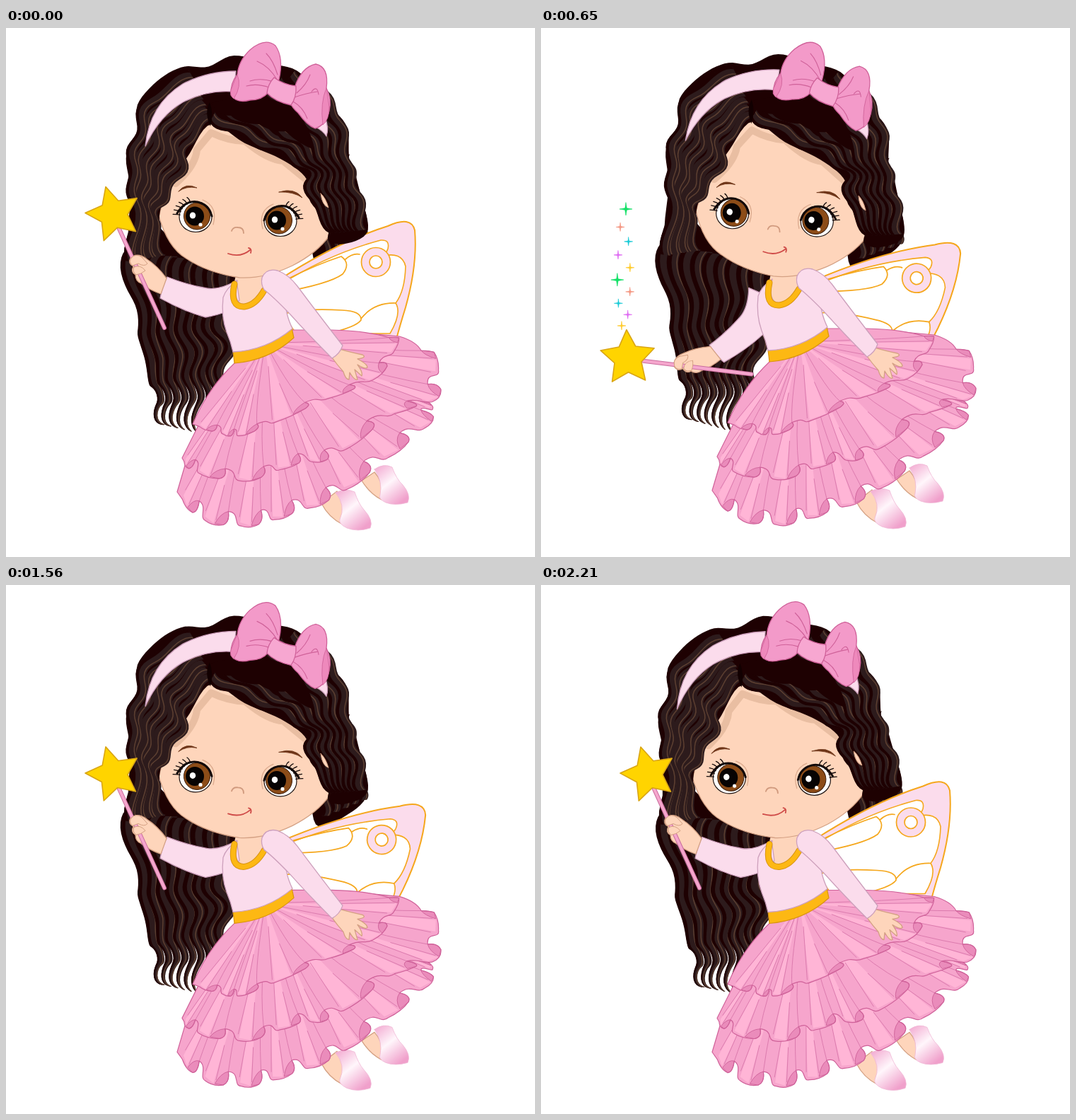
These frames come from a looping animation (748x748 px, 2340 ms). An HTML page:

```html
<!DOCTYPE html>
<html lang="en">
<head>
<meta charset="utf-8">
<title>Little fairy</title>
<style>
html, body { margin: 0; width: 100%; height: 100%; overflow: hidden; background: #fff; }
svg { display: block; width: 100vw; height: 100vh; }
</style>
</head>
<body>
<svg id="stage" viewBox="0 0 748 748"></svg>
<script>
const HAIR = '#2d1b1c', DARK = '#1e0102', SHINE = '#5c3f31';
const SKIN = '#fed5bb', SKIN_LINE = '#d4a184', PALE = '#fbdcec', PALE_LINE = '#cda0bc';
const ROSE = '#f6a5cc', ROSE_LIGHT = '#ffb5d6', ROSE_DARK = '#ea8cbb', ROSE_LINE = '#cf6199';
const GOLD = '#fdb813', GOLD_LINE = '#f5a71c';

// ---- geometry ----
const parse = s => s.split(' ').map(p => p.split(',').map(Number));
const lerp = (a, b, k) => [a[0] + (b[0] - a[0]) * k, a[1] + (b[1] - a[1]) * k];
const num = p => p[0].toFixed(1) + ',' + p[1].toFixed(1);

// Point at t (0..1) of a smooth curve through p
function spot(p, t) {
  const n = p.length - 1, i = Math.max(0, Math.min(n - 1, Math.floor(t * n))), u = t * n - i;
  const [a, b, c, e] = [p[Math.max(0, i - 1)], p[i], p[i + 1], p[Math.min(n, i + 2)]];
  return [0, 1].map(k => b[k] + u * ((c[k] - a[k]) + u * ((2 * a[k] - 5 * b[k] + 4 * c[k] - e[k]) +
    u * (3 * (b[k] - c[k]) + e[k] - a[k]))) / 2);
}

// ---- drawing helpers ----
const path = (d, fill = 'none', line = 'none', w = 1.3) =>
  `<path d="${d}" fill="${fill}" stroke="${line}" stroke-width="${w}" stroke-linejoin="round" stroke-linecap="round"/>`;
const oval = (x, y, rx, ry, fill, line = 'none', w = 1) =>
  `<ellipse cx="${x}" cy="${y}" rx="${rx}" ry="${ry}" fill="${fill}" stroke="${line}" stroke-width="${w}"/>`;
const group = (id, body) => `<g id="${id}">${body}</g>`;
const repeat = (n, draw) => Array.from({ length: n }, (_, i) => draw(i)).join('');

function blob(str, fill) {
  const p = parse(str), steps = p.length * 6;
  return path('M' + Array.from({ length: steps + 1 }, (_, i) => num(spot(p, i / steps))).join('L') + 'Z', fill);
}

function star(x, y, r, inner, tips, turn) {
  const pts = Array.from({ length: tips * 2 }, (_, i) => {
    const a = turn * Math.PI / 180 + i * Math.PI / tips, q = i % 2 ? inner : r;
    return num([x + q * Math.cos(a), y + q * Math.sin(a)]);
  });
  return 'M' + pts.join('L') + 'Z';
}

// Waving strip along p; side shifts it across the lock
function ribbon(p, w0, w1, amp, waves, side, fill) {
  const left = [], right = [], steps = 50;
  for (let i = 0; i <= steps; i++) {
    const t = i / steps, c = spot(p, t), a = spot(p, t - .02), b = spot(p, t + .02);
    const len = Math.hypot(b[0] - a[0], b[1] - a[1]) || 1;
    const nx = (a[1] - b[1]) / len, ny = (b[0] - a[0]) / len;
    const w = w1 + (w0 - w1) * (1 - t * t), off = amp * Math.sin(2 * Math.PI * waves * t) + side * w;
    const grow = fill === SHINE ? .8 : w / 2 * (side ? .3 : 1);
    left.push(num([c[0] + nx * (off + grow), c[1] + ny * (off + grow)]));
    right.unshift(num([c[0] + nx * (off - grow), c[1] + ny * (off - grow)]));
  }
  return path('M' + left.concat(right).join('L') + 'Z', fill);
}

// Locks spread evenly between two guide curves
function fan(from, to, count, w0, w1, amp, waves) {
  const a = parse(from), b = parse(to);
  return repeat(count, i => {
    const guide = a.map((p, j) => lerp(p, b[j], i / (count - 1)));
    return ribbon(guide, w0, w1, amp, waves, 0, HAIR) + ribbon(guide, w0, w1, amp, waves, .38, DARK) +
      ribbon(guide, w0, w1, amp, waves, i % 2 ? -.1 : -.3, SHINE);
  });
}

// ---- hair behind the body ----
const backHair =
  blob('430,190 480,180 500,230 511,290 480,322 438,334 430,260', DARK) +
  fan('440,180 450,250 452,322', '480,180 494,235 505,300', 5, 13, 11, 3, 3) +
  blob('186,250 168,310 174,360 205,405 240,425 312,440 328,345 280,320 225,290', DARK) +
  fan('180,315 182,372 202,425 200,470 217,505 212,535 224,561', '316,335 306,375 304,415 312,450 306,490 304,530 300,580',
    9, 23, 1.5, 6, 3.5);

// ---- wing ----
const wing =
  path('M386,356Q470,302 540,280Q573,265 578,286Q582,335 565,395Q556,424 552,440L420,434Q396,415 386,400Z', PALE, GOLD_LINE, 2) +
  path('M388,363Q455,320 530,300Q543,299 540,312Q538,319 530,323Q560,315 565,337Q564,372 551,389Q560,403 543,432L410,432L392,405Z', '#fff', GOLD_LINE, 1.6) +
  path('M400,354Q440,334 474,323Q488,333 476,348Q457,362 388,374M394,404Q420,396 475,399Q503,400 502,413Q495,423 455,432M502,411Q520,388 551,389M480,327Q490,318 500,320', 'none', GOLD_LINE, 1.7) +
  oval(523, 331, 20.5, 20.5, PALE, GOLD_LINE, 1.7) + oval(523, 331, 9, 9, '#fff', GOLD_LINE, 1.7);

// ---- legs and dress ----
const legs =
  path('M446,672Q456,692 476,702Q482,680 468,655Z', SKIN, SKIN_LINE) +
  path('M503,640Q514,658 531,667Q536,645 521,628Z', SKIN, SKIN_LINE) +
  path('M466,657Q480,650 493,656Q498,672 506,681Q520,696 515,707Q497,713 482,707Q470,701 472,695Q481,675 466,657Z', 'url(#shoe)', '#f0b8d6', .8) +
  path('M521,624Q534,615 546,621Q552,638 561,646Q573,660 568,671Q550,676 537,671Q526,666 529,660Q533,642 521,624Z', 'url(#shoe)', '#f0b8d6', .8);

// One row of tube ruffles along a hem; folds run towards the waist
function tier(hemKeys, count, edge, reach) {
  const hem = parse(hemKeys), waist = [366, 446];
  const out = t => spot(hem, Math.max(0, Math.min(1, t / count)));
  const up = (t, k) => num(lerp(out(t), waist, k));
  const inset = .075;
  let d = 'M' + up(0, 0), light = '', folds = '', curls = '';
  for (let i = 0; i < count; i++) {
    const bite = i ? inset : 0;
    d += `L${up(i, bite)}C${up(i + .35, bite)} ${up(i + .2, 0)} ${up(i + .42, 0)}` +
      `Q${up(i + .7, -.02)} ${up(i + .95, 0)}Q${up(i + 1.1, .02)} ${up(i + 1, inset)}`;
    light += `M${up(i + .38, .02)}L${up(i + .68, 0)}L${up(i + .68, reach)}L${up(i + .38, reach)}Z`;
    curls += `M${up(i + .72, 0)}Q${up(i + .8, inset * .8)} ${up(i + 1, inset)}Q${up(i + 1.1, .02)} ${up(i + .95, 0)}Z`;
    folds += `M${up(i + 1, inset)}Q${up(i + .88, .3)} ${up(i + .95, reach)}` +
      `M${up(i + .34, .05)}L${up(i + .42, reach * .8)}M${up(i + .72, .02)}L${up(i + .68, reach * .5)}`;
  }
  d += edge + 'Z';
  return path(d, ROSE) + path(light, ROSE_LIGHT) + path(curls, ROSE_DARK, ROSE_LINE, .9) +
    path(folds, 'none', '#dc7bae', 1) + path(d, 'none', ROSE_LINE, 1.2);
}

const skirt =
  tier('242,656 276,694 340,704 400,688 467,662 541,607 601,556 599,530', 9, 'L590,500L366,450L255,612', .42) +
  tier('249,608 268,628 340,640 410,616 464,606 550,545 612,521 605,457', 9, 'Q580,443 556,436L470,428L366,450L275,556', .55) +
  tier('264,560 306,574 343,573 441,530 527,492 556,437', 7, 'Q510,428 460,427L404,427L323,474Q285,510 264,560', .88) +
  path('M321,457Q366,456 404,424L407,438Q372,470 323,474Z', GOLD, '#d99511', 1.2);

const neck = path('M326,345L320,372Q328,396 350,390L370,366L364,342Z', SKIN);
const collar = 'M323,362Q316,395 337,394Q353,392 365,371';

const bodice =
  path('M327,357Q311,368 307,381Q304,408 312,430Q318,444 321,458Q368,456 405,425Q394,402 396,385L386,355Q372,348 364,366Q350,390 337,391Q320,390 327,357Z', PALE, PALE_LINE) +
  path(collar, 'none', '#d99511', 9) + path(collar, 'none', GOLD, 7) +
  path('M472,454Q486,458 504,462Q511,466 497,468Q511,475 511,480Q508,483 497,476Q505,487 503,492L493,483L497,497Q493,499 486,487L485,497Q480,497 477,486Q468,476 461,466Z', SKIN, SKIN_LINE) +
  path('M362,353Q368,339 384,343Q400,349 412,365Q438,400 476,449Q472,461 461,467Q428,434 402,405Q379,381 365,370Q360,362 362,353Z', PALE, PALE_LINE);

// ---- arm with wand ----
const wand = 'M160,284L224,424';
const arm =
  path('M326,357Q302,371 284,368Q255,363 228,352Q221,365 218,382Q250,400 282,409Q300,406 314,400L330,385Z', PALE, PALE_LINE) +
  path('M227,354Q215,337 198,326Q186,317 176,325Q172,333 180,337Q176,345 183,349Q183,358 191,361Q202,370 219,376Z', SKIN, SKIN_LINE) +
  path(wand, 'none', '#c96d9d', 6) + path(wand, 'none', '#f5a6cd', 4) +
  path('M177,325Q184,318 192,324L200,333Q196,338 187,333L179,336Q173,331 177,325ZM181,338Q190,334 197,343Q191,348 184,349Q178,344 181,338Z', SKIN, SKIN_LINE, 1) +
  path(star(152, 263, 40, 20, 5, -106), '#ffd400', '#d9a514', 1.6);

// ---- head ----
function eye(x, y, side) {
  const gaze = x - side * 2;
  const lashes = repeat(6, i => {
    const a = (side * 52 - 90 + (i - 2.5) * 13) * Math.PI / 180, c = Math.cos(a), s = Math.sin(a);
    return `M${num([x + 22 * c, y + 20 * s])}Q${num([x + 26 * c, y + 26 * s])} ${num([x + 30 * c + side * 2, y + 28 * s])}`;
  });
  const lid = `M${x + side * 26},${y - 4}Q${x + side * 15},${y - 23} ${x - side * 3},${y - 20}Q${x - side * 19},${y - 16} ${x - side * 23},${y}`;
  return path(`M${x - side * 10},${y - 23}Q${x - side * 32},${y - 14} ${x - side * 25},${y + 12}`, 'none', '#dba98c', 1.2) +
    oval(x, y + 1, 23, 21.5, '#fff', '#1b1110', 1.2) + oval(gaze, y, 18.5, 19, '#8c4c18', '#3b1b08', 1) +
    oval(gaze - 3, y, 13, 13.5, '#070303') + oval(gaze - 6, y - 1, 4.2, 4.5, '#fff') + oval(gaze + 5, y + 12, 2.6, 2.6, '#fff') +
    path(lid, 'none', '#120909', 3) + path(lashes, 'none', '#120909', 1.3);
}

const face =
  path('M240,190L289,130L420,180L452,240Q466,272 457,294Q440,318 405,336Q365,355 330,353Q285,346 255,326Q228,310 216,265Z', SKIN, SKIN_LINE) +
  path('M240,220Q268,195 270,172L290,148Q315,160 338,160Q370,187 392,188L424,214', 'none', '#e9bea2', 10) +
  eye(268, 266, -1) + eye(388, 272, 1) +
  path('M244,231Q254,218 270,226Q255,223 244,231ZM386,232Q408,225 419,240Q406,231 386,232Z', '#6e3518', '#6e3518', .8) +
  path('M319,287Q321,281 328,282Q336,282 336,290', 'none', '#d09a7e', 1.8) +
  path('M314,319Q332,325 345,314M343,311Q348,312 346,318', 'none', '#cf4b48', 1.8);

const frontHair =
  blob('222,318 176,310 176,230 170,180 188,140 186,108 215,74 250,55 285,55 322,39 370,50 414,62 455,108 482,140 486,190 503,240 511,288 480,305 456,300 ' +
    '456,276 430,245 424,212 390,186 338,163 290,136 258,180 232,222 217,265 222,318', DARK) +
  fan('288,124 254,160 246,200 222,238 208,272 217,322', '262,66 206,100 188,150 178,200 183,255 177,330', 7, 15, 14, 4, 4.5) +
  fan('292,126 342,152 392,174 430,202 434,240 466,286', '404,66 456,106 474,150 482,200 496,240 502,286', 7, 15, 15, 4, 4.5) +
  path('M290,106Q335,92 390,106Q430,130 436,172Q415,165 395,146Q375,148 358,136Q330,136 318,124Q300,124 290,106Z', DARK) +
  path('M288,105Q280,120 289,139Q294,122 288,105Z', '#120001') +
  path('M445,234Q452,240 456,254Q447,251 445,234Z', SKIN, SKIN_LINE, 1);

const bow =
  path('M197,167Q203,108 250,79Q285,61 325,61L322,90Q285,87 250,105Q217,124 197,167Z', PALE, PALE_LINE) +
  path('M438,140L451,126Q457,142 453,153Q448,145 438,140Z', PALE, PALE_LINE) +
  path('M386,73Q393,42 381,25Q366,13 345,31Q329,46 327,66Q317,78 318,95Q326,107 345,102Q362,102 371,91Z', '#f39ac9', ROSE_LINE) +
  path('M408,84Q418,55 438,51Q457,55 453,85Q461,100 457,117Q452,138 437,142Q426,138 413,120Q404,112 402,106Z', '#f39ac9', ROSE_LINE) +
  path('M327,66Q334,82 322,100Q316,95 318,88ZM453,85Q444,106 448,137Q457,130 457,112Z', '#ee89bc', ROSE_LINE, .8) +
  path('M384,74Q372,54 355,47M378,76Q360,70 345,75M372,84Q355,78 340,82M384,66Q378,46 368,36M408,98Q425,92 440,90M406,104Q420,112 426,128M411,92Q425,80 430,66M432,90Q440,80 442,94', 'none', ROSE_LINE, 1.1) +
  path('M379,70Q370,80 369,92Q380,104 403,109Q411,98 410,82Q392,80 379,70Z', '#f7a7d1', ROSE_LINE);

// Trail that widens towards the star
const tints = ['#12e066', '#f4947f', '#16c9d6', '#de68f2', '#ffc928'];
const sparkles = repeat(10, i => {
  const x = 117 + (3 + 2 * i) * Math.cos(3.3 * i), y = 256 + 165 * (i / 9) ** .85;
  const r = i % 5 ? 6 : 9, tint = tints[i % 5];
  return path(star(x, y, r, r * .2, 4, -90), tint, tint, .6);
});

const stage = document.getElementById('stage');
stage.innerHTML =
  '<defs><linearGradient id="shoe" x1="0" y1="0" x2=".7" y2="1"><stop offset="0" stop-color="#f2a6cf"/>' +
  '<stop offset=".5" stop-color="#fff6fb"/><stop offset="1" stop-color="#f0a0cb"/></linearGradient></defs>' +
  group('fairy', group('back', backHair) + group('wing', wing) + legs + skirt + neck +
    group('head', face + frontHair + bow) + group('arm', arm) + bodice) + group('sparkles', sparkles);

// ---- motion: nine held poses, the wand dips only in the first half of the loop ----
const STEP = 130, POSES = 9;

// Eased value between [pose, value] keys
function ease(keys, k) {
  const i = Math.max(1, keys.findIndex(key => key[0] >= k)), [a, b] = [keys[i - 1], keys[i]];
  const u = (k - a[0]) / (b[0] - a[0]);
  return a[1] + (b[1] - a[1]) * (1 - Math.cos(Math.PI * u)) / 2;
}
const lift = [[0, 0], [2, 6.5], [5, -2], [7.4, 6.5], [9, 0]];
const tilt = [[0, 0], [3, 0], [5, 2.6], [8, -1.7], [9, 0]];
const flap = [[0, 0], [3, 10], [5, 10], [8, 0], [9, 0]];
const dip = [[0, 0], [3, 0], [5, -58.5], [6, -58.5], [8, 0], [9, 0]];

const part = id => document.getElementById(id);
const turn = (id, deg, x, y) => part(id).setAttribute('transform', `rotate(${deg} ${x} ${y})`);

function show(time) {
  const n = Math.floor(time / STEP) % (2 * POSES), k = n % POSES;
  const reach = n < POSES ? ease(dip, k) : 0;
  part('fairy').setAttribute('transform', `translate(0 ${ease(lift, k)})`);
  for (const id of ['back', 'head']) turn(id, ease(tilt, k), 330, 325);
  turn('wing', ease(flap, k), 386, 390);
  turn('arm', reach, 321, 392);
  part('sparkles').setAttribute('visibility', reach < -50 ? 'visible' : 'hidden');
}

const begin = performance.now();
function tick() {
  show(performance.now() - begin);
  requestAnimationFrame(tick);
}
tick();
</script>
</body>
</html>
```
